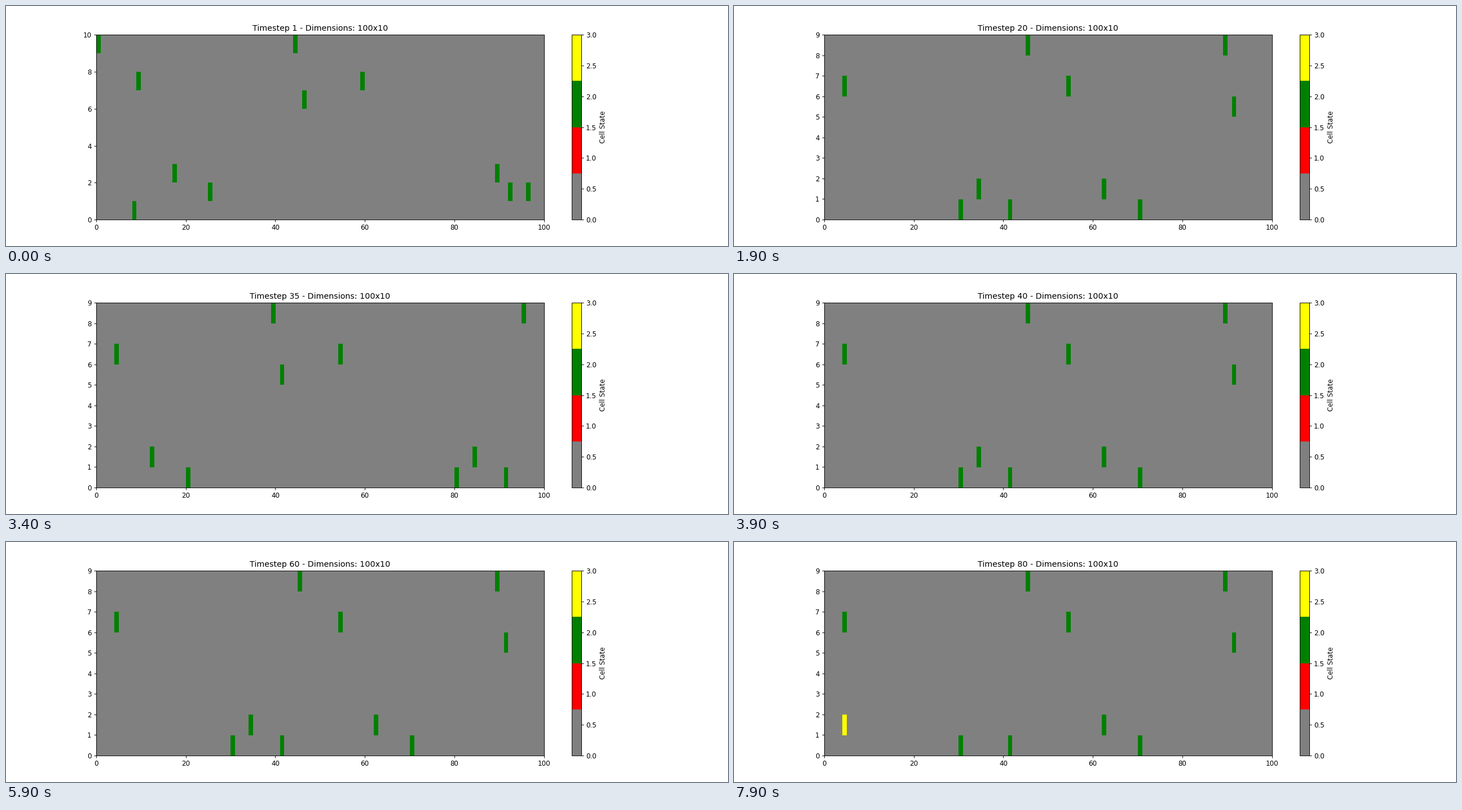
Recreate the animation shown at these times as a matplotlib script. Size 1280 px wide and 427 px high, loop 8000 ms.

```python
import numpy as np
import matplotlib.pyplot as plt
from matplotlib.animation import FuncAnimation
from matplotlib.colors import ListedColormap

LENGTH, LANES, STEPS = 100, 10, 80
V_MAX = 10
CAR, BROKEN = 2, 3
BREAKDOWN = (78, 2, 4)  # timestep, lane, cell

# lane -> starting cells
START = {0: [8], 1: [25, 92, 96], 2: [17, 89], 6: [46], 7: [9, 59], 9: [0, 44]}


def advance(lane):
    """Move all cars of a lane at once; each car is [cell, speed, state]."""
    cells = [car[0] for car in lane]
    for i, car in enumerate(lane):
        ahead = cells[(i + 1) % len(cells)]
        gap = (ahead - car[0] - 1) % LENGTH
        car[1] = 0 if car[2] == BROKEN else min(car[1] + 1, V_MAX, gap)
    for car in lane:
        car[0] = (car[0] + car[1]) % LENGTH


def simulate():
    lanes = {k: [[c, 0, CAR] for c in cells] for k, cells in START.items()}
    grids = []
    for step in range(1, STEPS + 1):
        if step == BREAKDOWN[0]:
            for car in lanes[BREAKDOWN[1]]:
                if car[0] == BREAKDOWN[2]:
                    car[2] = BROKEN
        if step > 1:
            for lane in lanes.values():
                advance(lane)
        grid = np.zeros((LANES, LENGTH))
        for k, lane in lanes.items():
            for cell, _, state in lane:
                grid[k, cell] = state
        # the bottom lane is only shown at the start
        grids.append(grid if step == 1 else grid[1:])
    return grids


grids = simulate()

dpi = 1280 / 15
fig, ax = plt.subplots(figsize=(1280.001 / dpi, 427.001 / dpi), dpi=dpi)
cmap = ListedColormap(["gray", "red", "green", "yellow"])
image = ax.imshow(grids[0], cmap=cmap, vmin=0, vmax=3, origin="lower",
                  aspect="auto", interpolation="nearest",
                  extent=(0, LENGTH, 0, LANES))
fig.colorbar(image, ax=ax, label="Cell State")
title = ax.set_title("")


def draw(i):
    grid = grids[i]
    rows = len(grid)
    image.set_data(grid)
    image.set_extent((0, LENGTH, 0, rows))
    ax.set_ylim(0, rows)
    title.set_text(f"Timestep {i + 1} - Dimensions: {LENGTH}x{LANES}")
    return image, title


anim = FuncAnimation(fig, draw, frames=STEPS, interval=100, repeat=True,
                     repeat_delay=0, blit=False)
plt.show()
```
